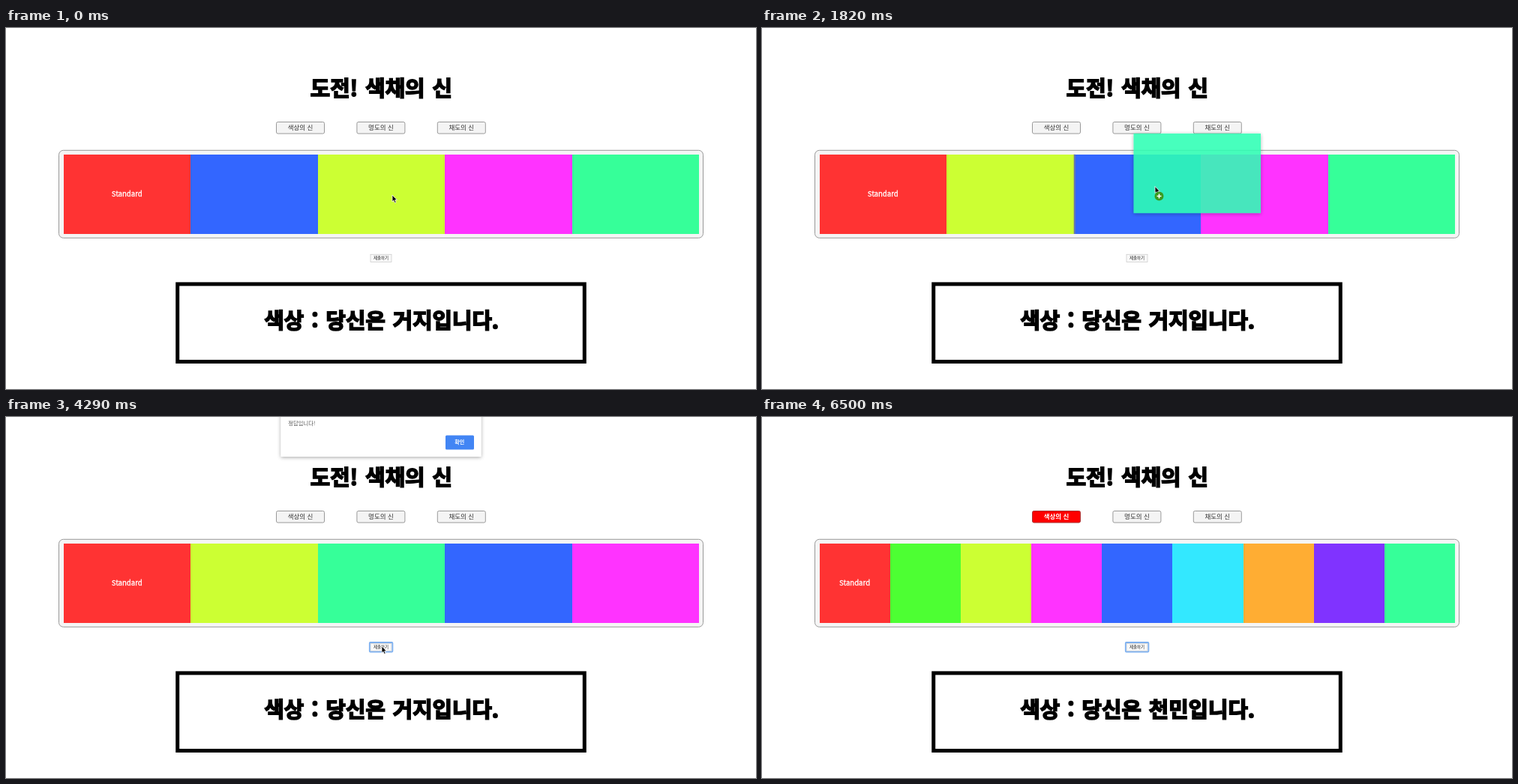
An HTML page for the animation above (6630 ms loop, 1000 by 482 pixels).

```html
<!DOCTYPE html>
<html lang="ko">
<head>
<meta charset="utf-8">
<title>도전! 색채의 신</title>
<style>
html, body { margin: 0; width: 100%; height: 100%; overflow: hidden; background: #fff; }
svg { display: block; width: 100vw; height: 100vh; }
text { font-family: "Noto Sans CJK KR", "Noto Sans CJK", sans-serif; text-anchor: middle; white-space: pre; }
.big { font-size: 28.7px; font-weight: 900; word-spacing: 2px; stroke: #000; stroke-width: 1.7; }
.mode rect { fill: #f4f4f4; stroke: #999; }
.mode text { font-size: 8.5px; fill: #333; }
.mode.on rect { fill: #f00; stroke: #a33; }
.mode.on text { fill: #fff; font-weight: 700; }
#standard { font-size: 9.6px; fill: #fff; stroke: #fff; stroke-width: .3; }
</style>
</head>
<body>
<svg viewBox="0 0 1000 482">
  <defs>
    <filter id="soft" x="-20%" y="-30%" width="140%" height="160%">
      <feDropShadow dx="0" dy="1" stdDeviation="2.5" flood-color="#000" flood-opacity=".35"/>
    </filter>
  </defs>
  <text class="big" x="500.3" y="90.5">도전! 색채의 신</text>
  <g id="modes"></g>
  <rect x="70.5" y="163.3" width="859" height="117" rx="6" fill="#f5f5f5" stroke="#999"/>
  <g id="cells" shape-rendering="crispEdges"></g>
  <text id="standard" y="225">Standard</text>
  <rect id="strip" width="2.5" fill="#808080" fill-opacity=".6"/>
  <rect x="486" y="302.3" width="28" height="10" fill="#fafafa" stroke="#ccc" stroke-width=".8"/>
  <text x="500" y="309.2" font-size="5.5" fill="#222">제출하기</text>
  <rect id="focus" x="484.8" y="301" width="30.6" height="12.6" rx="1" fill="none" stroke="#7db0f0" stroke-width="1.8"/>
  <rect x="228.7" y="341.9" width="542.6" height="103.6" fill="none" stroke="#000" stroke-width="5"/>
  <text id="result" class="big" x="500.8" y="401.2"></text>
  <g id="dialog">
    <rect x="366.5" y="-20" width="267" height="73" rx="1" fill="#fff" filter="url(#soft)"/>
    <text x="394.3" y="11.3" font-size="7.3" fill="#555">정답입니다!</text>
    <rect id="ok" x="586" y="24.5" width="38" height="19" rx="1.5"/>
    <text x="604.7" y="36.3" font-size="7.1" font-weight="700" fill="#fff">확인</text>
  </g>
  <rect id="ghost" opacity=".88" filter="url(#soft)"/>
  <g id="cursor">
    <path d="M0 0V9L2 7.2L3.5 10.5L5.1 9.8L3.7 6.6H6.4Z" stroke="#fff" stroke-width=".8"/>
    <g id="plus">
      <circle cx="5.5" cy="13" r="6" fill="#3a9a1e"/>
      <path d="M2.5 13h6M5.5 10v6" stroke="#fff" stroke-width="1.6"/>
    </g>
  </g>
</svg>
<script>
const LOOP = 6630, STEP = 130, LAG = 28;
const LEFT = 76.5, TOP = 168.7, WIDTH = 847.5, HEIGHT = 106.3;
const SWAP = 1300, DROP = 2470, SUBMIT = 3900, ALERT = 4290, CLOSE = 5330;

const colors = {
  R: '#ff3333', B: '#3366ff', Y: '#ccff33', M: '#ff33ff', G: '#36ff99',
  L: '#4dff33', C: '#33e8ff', O: '#ffad33', P: '#8033ff'
};

// Stops of the pointer: time, x, y.
const stops = [
  [0, 515, 223], [650, 307, 222], [SWAP, 640, 224], [1560, 814, 236],
  [1690, 668, 196], [1820, 524, 211.5], [2300, 422, 226], [3380, 462, 326],
  [3770, 500, 306], [ALERT, 501, 306], [4940, 608.5, 34.5],
  [CLOSE, 608.5, 34.5], [6500, 640, 492]
];
const drags = [
  { from: 650, to: SWAP, cell: 'B', fill: '#3366ff' },
  { from: 1560, to: DROP, cell: 'G', fill: '#2effb4' }
];

const $ = id => document.getElementById(id);
const show = (id, on) => $(id).setAttribute('display', on ? 'inline' : 'none');
const move = (id, x, y) => $(id).setAttribute('transform', `translate(${x} ${y})`);

function set(el, attrs) {
  for (const k in attrs) el.setAttribute(k, attrs[k]);
  return el;
}

function make(parent, tag, attrs, text = '') {
  const el = set(document.createElementNS('http://www.w3.org/2000/svg', tag), attrs);
  el.textContent = text;
  return parent.appendChild(el);
}

function pointer(t) {
  const i = stops.findIndex(s => s[0] > t);
  if (i < 0) return stops[stops.length - 1].slice(1);
  const [t0, x0, y0] = stops[i - 1], [t1, x1, y1] = stops[i];
  const u = (t - t0) / (t1 - t0);
  return [x0 + (x1 - x0) * u, y0 + (y1 - y0) * u];
}

function orderAt(t) {
  if (t < SWAP) return 'RBYMG';
  if (t < DROP) return 'RYBMG';
  return t < CLOSE ? 'RYGBM' : 'RLYMBCOPG';
}

const modes = ['색상의 신', '명도의 신', '채도의 신'].map((label, i) => {
  const x = 360.5 + i * 107.4;
  const g = make($('modes'), 'g', { class: 'mode' });
  make(g, 'rect', { x, y: 125.5, width: 64, height: 15.5, rx: 2 });
  make(g, 'text', { x: x + 32, y: 136.3 }, label);
  return g;
});

let shown = '';
function layCells(order, w) {
  if (order === shown) return;
  shown = order;
  $('cells').replaceChildren();
  [...order].forEach((c, i) => make($('cells'), 'rect', {
    x: LEFT + i * w, y: TOP, width: w, height: HEIGHT, fill: colors[c]
  }));
  $('standard').setAttribute('x', LEFT + w / 2);
}

// The ghost keeps its grab point and trails the pointer slightly.
function drawGhost({ from, cell, fill }, t, order, w) {
  const [gx, gy] = pointer(from), [x, y] = pointer(t - LAG);
  const home = LEFT + order.indexOf(cell) * w;
  set($('ghost'), { width: w, height: HEIGHT, fill });
  move('ghost', x - gx + home, y - gy + TOP);
}

function draw(t) {
  const order = orderAt(t), w = WIDTH / order.length;
  const solved = t >= CLOSE;
  const [x, y] = pointer(t);
  const drag = drags.find(d => t > d.from && t < d.to);
  const over = Math.floor((x - LEFT) / w);

  layCells(order, w);
  move('cursor', x, y);
  show('plus', drag);
  show('ghost', drag);
  if (drag) drawGhost(drag, t, order, w);

  // Insertion edge of the cell under the pointer.
  show('strip', drag && order[over] !== drag.cell);
  set($('strip'), { x: LEFT + over * w, y: TOP, height: HEIGHT });

  show('focus', t >= SUBMIT);
  show('dialog', t >= ALERT && !solved);
  const hover = x > 586 && x < 624 && y > 24 && y < 44;
  $('ok').setAttribute('fill', hover ? '#6792e0' : '#4285f4');
  modes[0].classList.toggle('on', solved);
  $('result').textContent = `색상 : 당신은 ${solved ? '천민' : '거지'}입니다.`;
}

function tick() {
  const t = performance.now() % LOOP;
  draw(Math.floor(t / STEP) * STEP);
  requestAnimationFrame(tick);
}
tick();
</script>
</body>
</html>
```
